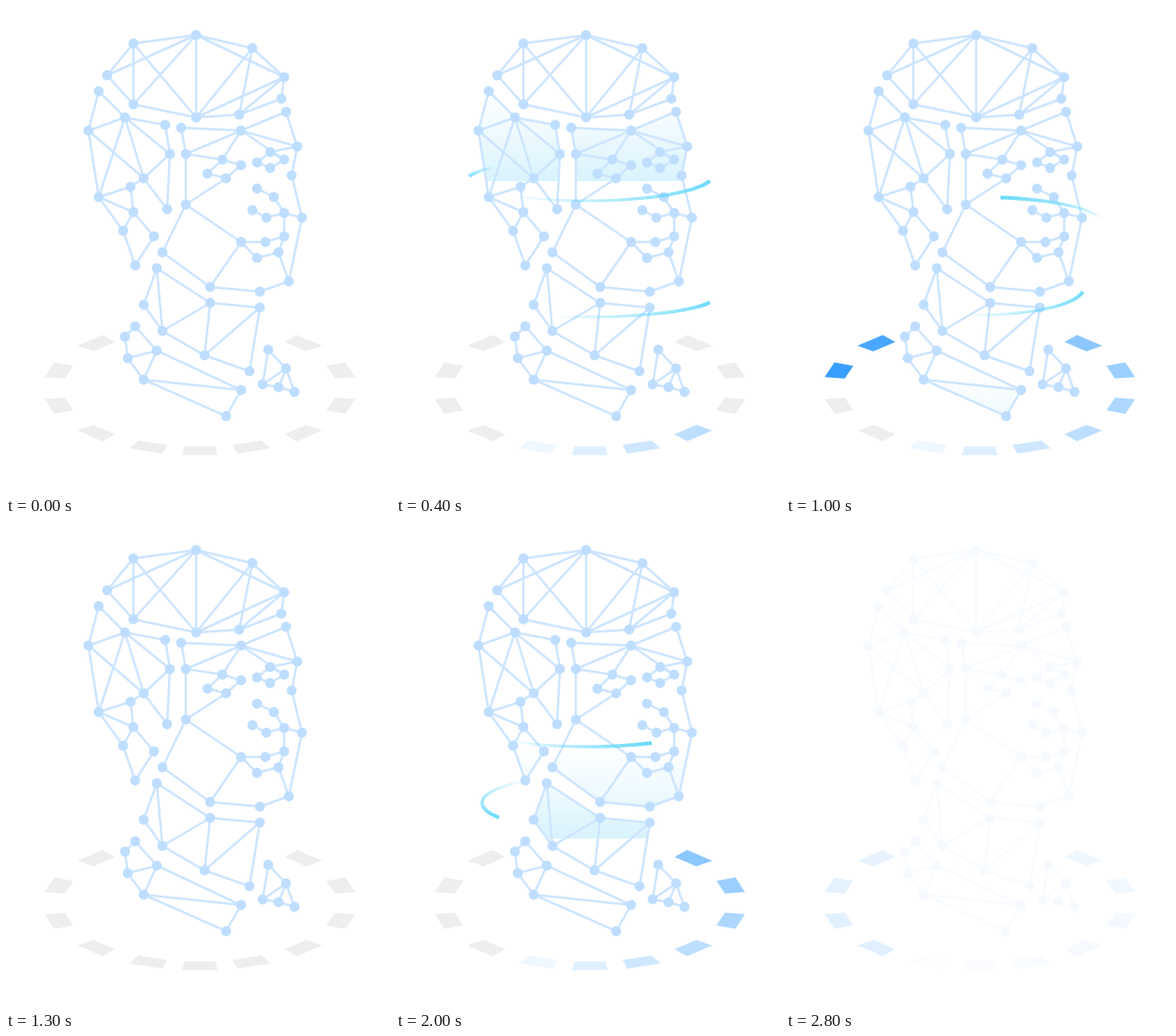
An HTML page with a canvas that plays this animation: 410x520 px, repeating every 2900 ms.

```html
<!DOCTYPE html>
<html>
<head>
<meta charset="utf-8">
<style>
html, body { margin: 0; width: 100%; height: 100%; overflow: hidden; background: #fff; }
canvas { display: block; }
</style>
</head>
<body>
<canvas id="stage" width="410" height="520"></canvas>
<script>
const canvas = document.getElementById('stage');
const ctx = canvas.getContext('2d');
const STEP = 100, STEPS = 29, SCAN_STEPS = 13, FADE_START = 2 * SCAN_STEPS;
const LETTERS = 'abcdefghijklmnopqrstuvwxyzABCD';

// A part of the head: its nodes are named a, b, c... and the strokes and scanned outline spell them.
const part = (nodes, strokes, outline = '') => {
  const trace = word => [...word].map(letter => nodes[LETTERS.indexOf(letter)]);
  return { nodes, strokes: strokes.split(' ').map(trace), outline: trace(outline) };
};

const skull = part(
  [[203,31],[136,40],[263,45],[108,74],[297,76],[294,99],[136,105],[249,116],[203,119]],
  'dbacefhigd bg bi da ga ai ae ic ie ch eh');
const ear = part(
  [[99,91],[127,119],[170,127],[88,133],[175,158],[147,184],[133,193],[99,204],
   [172,217],[136,220],[125,240],[158,246],[138,277]],
  'dabceifghdb be bf bh df ef gjlmkh hjk', 'abceilmkhd');
const face = part(
  [[187,130],[251,133],[299,113],[311,150],[192,158],[231,164],[251,170],[215,179],[235,184],[282,156],
   [297,164],[268,167],[282,173],[305,181],[268,195],[286,204],[297,221],[278,226],[263,218],[316,226],
   [192,212],[297,246],[277,252],[251,252],[268,269],[291,263],[302,294],[271,305],[218,300],[167,263]],
  'abcdntABCDuea ebd bfe fgihf bk jkmlj jd opqrs tqvwxyzv zA uxC ui', 'abcdntABCDue');
const neck = part(
  [[161,280],[218,317],[271,322],[147,319],[167,347],[212,373],[260,390]],
  'abcgfeda aebfc', 'abcgfed');
const shoulder = part(
  [[138,342],[127,353],[130,376],[161,368],[147,399],[251,410],[235,438]],
  'abcegfda cde ef', 'adfgecb');
const collar = part(
  [[280,367],[299,387],[274,404],[291,407],[308,412]],
  'abcdeb ac bd', 'abedc');
const parts = [skull, ear, face, neck, shoulder, collar];

// Light trails circling the head; angle and y hold for the leading end at step `at`.
const TURN = 0.81, GROW_STEPS = 3;
const trails = [
  { from: 1, to: 6, at: 4, angle: 0.24, sweep: 1.9, rx: 134, ry: 28, y: 180, fall: 0 },
  { from: 1, to: 6, at: 4, angle: 0.3, sweep: 1.5, rx: 136, ry: 22, y: 310, fall: 0 },
  { from: 4, to: 10, at: 7, angle: 1.04, sweep: 1.15, rx: 134, ry: 29, y: 212, fall: 7 },
  { from: 5, to: 12, at: 7, angle: 2.57, sweep: 1.5, rx: 113, ry: 29, y: 301, fall: 0 }
];

function addPolygon(points) {
  points.forEach(([x, y], i) => i ? ctx.lineTo(x, y) : ctx.moveTo(x, y));
  ctx.closePath();
}

// Fourteen tiles in a ring, lit one by one; three are hidden behind the neck.
function drawTiles(step) {
  const count = 14, firstHidden = 7, hidden = 3, halfWidth = 0.113;
  const corner = (angle, scale) =>
    [207 + 168 * scale * Math.cos(angle), 408 + 72 * scale * Math.sin(angle)];
  for (let i = 0; i < count; i++) {
    const behind = i >= firstHidden;
    if (behind && i < firstHidden + hidden) continue;
    const even = Math.PI / 2 + (1 - i) * 2 * Math.PI / count;
    const angle = even + 0.122 * Math.sin(2 * even);
    const start = angle - halfWidth, end = angle + halfWidth;
    const lit = step >= (behind ? i - 1 : i + 1);
    ctx.fillStyle = lit ? `rgb(${255 - 16.5 * (i + 1)},${255 - 8 * (i + 1)},255)` : '#eee';
    ctx.beginPath();
    addPolygon([corner(start, 1), corner(end, 1), corner(end, 0.87), corner(start, 0.87)]);
    ctx.fill();
  }
}

function drawScan(step) {
  if (step < 3) return;
  const bottom = 187 + (step - 4) * 50.7, height = 95;
  const glow = ctx.createLinearGradient(0, bottom - height, 0, bottom);
  glow.addColorStop(0, 'rgba(205,239,252,0)');
  glow.addColorStop(1, 'rgba(205,239,252,0.75)');
  ctx.save();
  ctx.beginPath();
  parts.forEach(({ outline }) => addPolygon(outline));
  ctx.clip();
  ctx.fillStyle = glow;
  ctx.fillRect(0, bottom - height, 410, height);
  ctx.restore();
}

function drawTrail({ from, to, at, angle, sweep, rx, ry, y, fall }, step) {
  if (step < from || step > to) return;
  const passed = step - at, pieces = 40;
  const head = angle - passed * TURN;
  const piece = sweep * Math.min(1, (step - from + 1) / GROW_STEPS) / pieces;
  for (let i = 0; i < pieces; i++) {
    const left = 1 - i / pieces, start = head + i * piece;
    ctx.strokeStyle = `rgba(84,212,250,${0.9 * left ** 0.8})`;
    ctx.lineWidth = 2.5 + 1.5 * left;
    ctx.beginPath();
    ctx.ellipse(205, y + passed * fall, rx, ry, 0, start, start + piece);
    ctx.stroke();
  }
}

function drawMesh() {
  ctx.strokeStyle = '#cde5ff';
  ctx.fillStyle = '#bfdeff';
  ctx.lineWidth = 2.5;
  for (const { nodes, strokes } of parts) {
    ctx.beginPath();
    for (const points of strokes) {
      points.forEach(([x, y], i) => i ? ctx.lineTo(x, y) : ctx.moveTo(x, y));
    }
    ctx.stroke();
    for (const [x, y] of nodes) {
      ctx.beginPath();
      ctx.arc(x, y, 5.4, 0, 2 * Math.PI);
      ctx.fill();
    }
  }
}

function draw(time) {
  const frame = Math.floor(time / STEP) % STEPS;
  const fading = frame >= FADE_START;
  const step = fading ? SCAN_STEPS - 1 : frame % SCAN_STEPS;
  ctx.clearRect(0, 0, 410, 520);
  drawTiles(step);
  if (!fading) drawScan(step);
  drawMesh();
  if (!fading) trails.forEach(trail => drawTrail(trail, step));
  canvas.style.opacity = fading ? 1 - 0.29 * (frame - FADE_START + 1) : 1;
}

let startTime;
function tick(now) {
  startTime ??= now;
  draw(now - startTime);
  requestAnimationFrame(tick);
}
requestAnimationFrame(tick);
</script>
</body>
</html>
```
